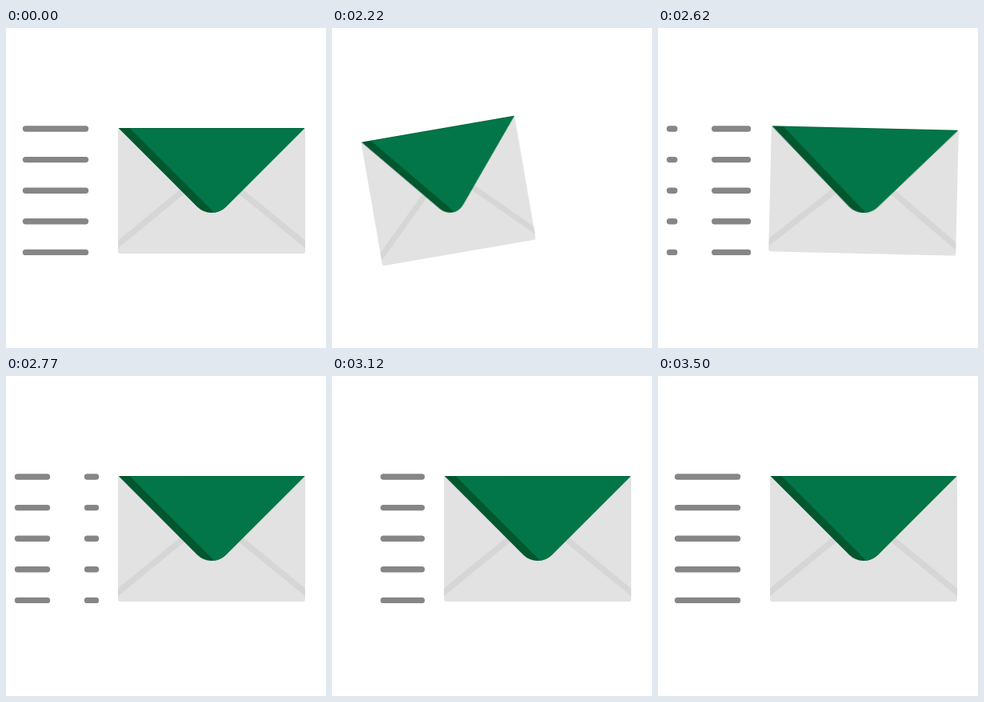
Recreate the animation shown at these times as an HTML page without scripts. Size 400 px wide and 400 px high, loop 3.52 s.

```html
<!DOCTYPE html>
<html lang="en">
<head>
<meta charset="utf-8">
<title>Sending mail</title>
<style>
  html, body { margin: 0; width: 100%; height: 100%; overflow: hidden; background: #fff; }
  svg { display: block; width: 100%; height: 100%; }

  .speed {
    fill: none; stroke: #868686; stroke-width: 7.4; stroke-linecap: round;
    animation: stream 3520ms infinite, blink 3520ms step-end infinite;
  }
  .envelope {
    transform-origin: 257px 203.5px;
    animation: dart 3520ms infinite;
  }

  /* Dash plus gap always equals the 98px track, so the dash wraps around. */
  @keyframes stream {
    0%      { stroke-dasharray: 75px 23px; stroke-dashoffset: -10px; animation-timing-function: step-end; }
    57.38%  { stroke-dasharray: 41px 57px; stroke-dashoffset: -10px; animation-timing-function: steps(4); }
    60.22%  { stroke-dasharray: 9px 89px;  stroke-dashoffset: -10px; animation-timing-function: steps(2); }
    61.64%  { stroke-dasharray: 0px 98px;  stroke-dashoffset: -10px; animation-timing-function: step-end; }
    71.59%  { stroke-dasharray: 48px 50px; stroke-dashoffset: -3px;  animation-timing-function: steps(10); }
    78.69%  { stroke-dasharray: 48px 50px; stroke-dashoffset: 109px; animation-timing-function: steps(9); }
    85.22%  { stroke-dasharray: 48px 50px; stroke-dashoffset: 206px; animation-timing-function: steps(3); }
    87.21%  { stroke-dasharray: 48px 50px; stroke-dashoffset: 236px; animation-timing-function: steps(8); }
    92.89%  { stroke-dasharray: 48px 50px; stroke-dashoffset: 269px; animation-timing-function: steps(9); }
    99.43%, 100% { stroke-dasharray: 75px 23px; stroke-dashoffset: 284px; }
  }

  @keyframes blink {
    0%, 71.59%, 100% { opacity: 1; }
    61.64% { opacity: 0; }
  }

  /* Pull back, dart forward, then wobble to rest. */
  @keyframes dart {
    0%     { transform: translateX(0) rotate(0deg) scaleX(1); animation-timing-function: step-end; }
    57.38% { transform: translateX(-46.5px) rotate(-4deg) scaleX(.924); animation-timing-function: steps(2); }
    58.8%  { transform: translateX(-85px) rotate(-7.5deg) scaleX(.87); animation-timing-function: steps(2); }
    60.22% { transform: translateX(-101px) rotate(-8.9deg) scaleX(.847); animation-timing-function: ease-out; }
    64.48% { transform: translateX(-113px) rotate(-10deg) scaleX(.83); animation-timing-function: linear; }
    67.5%  { transform: translateX(-113px) rotate(-10deg) scaleX(.83); animation-timing-function: ease-in; }
    69.6%  { transform: translateX(-106px) rotate(-9.4deg) scaleX(.84); animation-timing-function: steps(2); }
    71.02% { transform: translateX(-81.75px) rotate(-7.2deg) scaleX(.873); animation-timing-function: step-end; }
    71.59% { transform: translateX(-20px) rotate(-1.8deg) scaleX(.97); animation-timing-function: ease-out; }
    72.44% { transform: translateX(0) rotate(0deg) scaleX(1); animation-timing-function: ease-out; }
    73.79% { transform: translateX(0) rotate(1.6deg) scaleX(1); animation-timing-function: ease-in-out; }
    77.06% { transform: translateX(0) rotate(-1.6deg) scaleX(1); animation-timing-function: ease-in-out; }
    80.33% { transform: translateX(0) rotate(1.6deg) scaleX(1); animation-timing-function: ease-in-out; }
    83.59% { transform: translateX(0) rotate(-1.6deg) scaleX(1); animation-timing-function: ease-in-out; }
    86.86% { transform: translateX(0) rotate(1.6deg) scaleX(1); animation-timing-function: ease-in-out; }
    90.1%  { transform: translateX(0) rotate(-1deg) scaleX(1); animation-timing-function: ease-in-out; }
    92.89% { transform: translateX(0) rotate(-.3deg) scaleX(1); animation-timing-function: ease-out; }
    96%, 100% { transform: translateX(0) rotate(0deg) scaleX(1); }
  }
</style>
</head>
<body>
<svg viewBox="0 0 400 400" role="img" aria-label="Envelope being sent">
  <defs>
    <clipPath id="body"><rect x="140" y="125" width="234" height="157" rx="3"/></clipPath>
  </defs>
  <g class="speed">
    <path d="M14.5 126h98"/>
    <path d="M14.5 164.6h98"/>
    <path d="M14.5 203.2h98"/>
    <path d="M14.5 241.8h98"/>
    <path d="M14.5 280.4h98"/>
  </g>
  <g class="envelope">
    <g clip-path="url(#body)">
      <path fill="#e2e2e2" d="M140 125h234v157h-234z"/>
      <path fill="none" stroke="#d6d6d6" stroke-width="7.5" d="M132 277L232 195M382 277L282 195"/>
    </g>
    <path fill="#02572f" d="M140.5 125H373.5L275 223.5A25.5 25.5 0 0 1 239 223.5Z"/>
    <path fill="#027648" d="M155 125.6H373L275 223.5A25.5 25.5 0 0 1 260.3 230.8Z"/>
  </g>
</svg>
</body>
</html>
```
